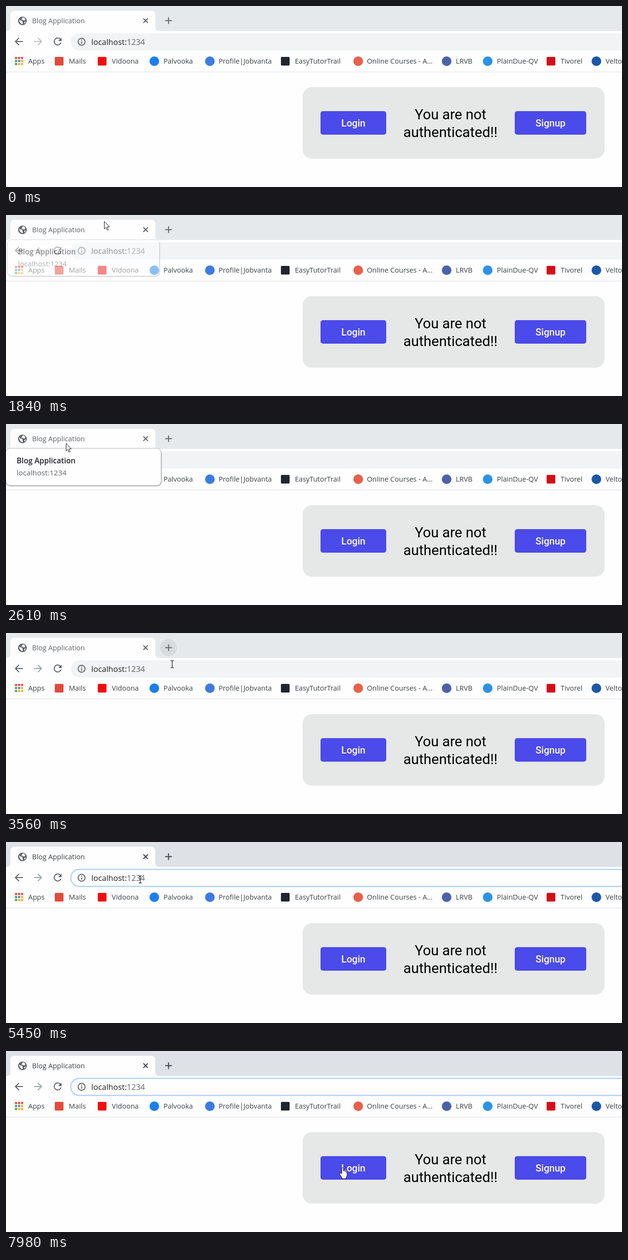
Animation of 1275x377 px, one loop 8 s. Source, as an HTML page:

```html
<!DOCTYPE html>
<html lang="en">
<head>
<meta charset="utf-8">
<title>Blog Application</title>
<style>
  html, body { margin: 0; width: 100%; height: 100%; overflow: hidden; background: #fefefe; }
  svg { display: block; --strip: #e6e9ec; --tab: #5f6368; --forward: #bcbec0; }
  svg.late { --forward: #98a4a6; }
  svg.active { --strip: #dee1e6; --tab: #3c4043; }
  text { font: 14.5px "Open Sans", "Noto Sans", sans-serif; fill: #3c4043; }
  .url { font-size: 16.5px; fill: #202124; }
  .grey { fill: #5f6368; }
  .tip { font-size: 15.3px; }
  .bold { font-size: 15.6px; font-weight: 600; fill: #202124; }
  .card text { font-family: Roboto, sans-serif; text-anchor: middle; }
  .card .note { font-size: 29.4px; fill: #000; }
  .card .label { font-size: 20px; font-weight: 500; fill: #fff; }
  .line { fill: none; stroke: #5f6368; stroke-width: 2; }
  .tabline { fill: none; stroke: var(--tab); stroke-width: 2; }
  .button { fill: #4b4aea; }
  #omnibox { fill: #f1f3f4; }
  .active #omnibox { fill: #fefefe; stroke: #b3d2f8; stroke-width: 2.5; }
</style>
</head>
<body>
<svg id="stage" width="1275" height="377" viewBox="0 0 1275 377">
  <rect width="1275" height="377" fill="#fefefe"/>
  <rect width="1275" height="52" fill="var(--strip)"/>
  <path d="M1 52Q9 52 9 44V19Q9 10 18 10H300Q309 10 309 19V44Q309 52 317 52Z" fill="#fefefe"/>
  <circle cx="34" cy="31" r="9" fill="#5f6368"/>
  <path d="M27 28Q30 31 34 31V34Q36 35 34 38Q28 36 27 28ZM34 24Q38 23 40 28Q38 32 35 29L31 28Q34 27 34 24ZM38 33L41 32Q40 36 38 37Z" fill="#fefefe"/>
  <text x="54" y="36" style="fill:var(--tab)">Blog Application</text>
  <path class="tabline" d="M284.3 25.800L293.700 35.200M293.700 25.800L284.300 35.200"/>
  <circle id="plusHover" cx="336.5" cy="30.5" r="17.5" fill="#d8dbde"/>
  <path class="tabline" d="M329.5 30.5H343.5M336.5 23.5V37.5"/>

  <path class="line" d="M35 74H20M27 66.5L19.5 74L27 81.5"/>
  <path class="line" style="stroke:var(--forward)" d="M58 74H73M66 66.5L73.5 74L66 81.5"/>
  <path class="line" d="M112.5 69A7.3 7.3 0 1 0 114 76"/>
  <path d="M115 66V73H108Z" fill="#5f6368"/>
  <rect id="omnibox" x="134" y="57" width="1200" height="35.5" rx="17.7"/>
  <circle class="line" cx="156.5" cy="74.5" r="7.2"/>
  <path class="line" d="M156.5 70V72M156.5 73.5V78.5"/>
  <text class="url" x="176.5" y="81">localhost:<tspan class="grey">1234</tspan></text>
  <path id="caret" d="M288.5 62V85" stroke="#202124"/>

  <rect id="pill" y="97" height="35" rx="17.5" fill="#ededee"/>
  <g id="bookmarks"></g>
  <path d="M0 137.5H1275" stroke="#dcdee1"/>

  <g class="card">
    <rect x="614" y="169" width="625" height="149" rx="19" fill="#e6e8e7"/>
    <rect class="button" x="651" y="219" width="136" height="49" rx="5"/>
    <rect class="button" x="1053" y="219" width="148" height="49" rx="5"/>
    <text class="label" x="719" y="251">Login</text>
    <text class="label" x="1127" y="251">Signup</text>
    <text class="note" x="920" y="236">You are not</text>
    <text class="note" x="920" y="273">authenticated!!</text>
  </g>

  <g id="tooltip">
    <rect x="-1" y="52" width="323.5" height="78" rx="10" fill="#000" opacity=".25"/>
    <rect x="-.5" y="50.5" width="321.5" height="77.5" rx="9" fill="#fefefe" stroke="#b0b2b4"/>
    <text class="tip bold" x="22" y="82">Blog Application</text>
    <text class="tip grey" x="22" y="107">localhost:1234</text>
  </g>

  <g id="cursor">
    <path id="arrow" d="M.5 .5V16L4 12.7L6.5 18.7L9 17.6L6.5 11.8H11.2Z" fill="#fff" stroke="#111"/>
    <path id="beam" d="M-3.5 -7.5H-1L0 -6.5L1 -7.5H3.5M0 -6.5V6.5M-3.5 7.5H-1L0 6.5L1 7.5H3.5" fill="none" stroke="#111" stroke-width="1.2"/>
    <path id="hand" d="M-2 12V1.5Q-2 0 -.2 0Q1.5 0 1.5 1.5V7Q3.5 6 4.5 8Q6.5 7 7 9Q9 8.5 9 11V15Q9 18 7 20V23H-2V20L-6.5 13.5Q-7 11.5 -5 11.5Z" fill="#fff" stroke="#111"/>
  </g>
</svg>
<script>
const $ = id => document.getElementById(id);
const show = (id, on) => { $(id).style.display = on ? "" : "none"; };
const clamp = v => Math.max(0, Math.min(1, v));
const svg = (tag, attrs, parent) => {
  const el = document.createElementNS("http://www.w3.org/2000/svg", tag);
  for (const key in attrs) el.setAttribute(key, attrs[key]);
  return parent.appendChild(el);
};

// icon left, text left, label, icon colour, round icon
const bookmarks = [
  [18, 46, "Apps"],
  [101, 130, "Mails", "#e34a3c"],
  [190, 219, "Vidoona", "#f20d0d"],
  [297, 326, "Palvooka", "#1a80ee", 1],
  [412, 440, "Profile|Jobvanta", "#3d7be0", 1],
  [569, 598, "EasyTutorTrail", "#22252e"],
  [719, 747, "Online Courses - A...", "#e8604c", 1],
  [902, 931, "LRVB", "#4c62a8", 1],
  [987, 1016, "PlainDue-QV", "#2b93e6", 1],
  [1119, 1148, "Tivorel", "#d40d18"],
  [1212, 1241, "Velto", "#1c58a8", 1],
  [1320]
];
const gridColors = ["#e2553f", "#e2553f", "#e2553f", "#4da25c", "#4b83dd", "#efb02c", "#4da25c", "#efb02c", "#efb02c"];
const bar = $("bookmarks");
for (const [x, textX, label, color, round] of bookmarks) {
  if (!label) continue;
  if (color) svg("rect", { x, y: round ? 105 : 106, width: round ? 20 : 18, height: round ? 20 : 18, rx: round ? 10 : 2, fill: color }, bar);
  else gridColors.forEach((fill, i) => svg("rect", { x: 18.5 + i % 3 * 6.3, y: 106 + Math.floor(i / 3) * 6.3, width: 4.5, height: 4.5, fill }, bar));
  svg("text", { x: textX, y: 120 }, bar).textContent = label;
}

// time, x, y
const path = [
  [320, 712, 334], [458, 661, 304], [600, 661, 304], [873, 215, 154],
  [1085, 215, 154], [1650, 210, 2], [1770, 207, 4], [1841, 203, 13],
  [1911, 200, 19], [2603, 124, 40], [2750, 122, 42], [3180, 322, 26],
  [3340, 353, 30], [3410, 357, 40], [3560, 347, 65], [3640, 325, 66],
  [3970, 148, 72], [4500, 148, 72], [4675, 287, 77], [5100, 287, 77],
  [5160, 288, 77], [5240, 288, 77], [5440, 278, 78], [6060, 203, 79],
  [6140, 203, 79], [6199, 204, 79], [6345, 204, 79], [6800, 460, 61],
  [7160, 575, 108], [7237, 574, 111], [7560, 636, 168], [7760, 672, 214],
  [7925, 697, 243]
];
function pointer(t) {
  const i = path.findIndex(p => p[0] > t);
  if (i < 0) return path[path.length - 1].slice(1);
  if (i === 0) return path[0].slice(1);
  const [a, b] = [path[i - 1], path[i]];
  const k = (t - a[0]) / (b[0] - a[0]);
  return [1, 2].map(n => Math.round(a[n] + (b[n] - a[n]) * k));
}

const LOOP = 8000, STEP = 69.17, START = 320, FOCUS = 4765, BLINK = 533;
function draw(t) {
  // the screen refreshes in even steps
  const q = START + Math.floor((t - START + 12) / STEP) * STEP;
  const [x, y] = pointer(q);
  const shown = t >= START;

  $("stage").setAttribute("class", (t >= 3300 ? "late " : "") + (t >= FOCUS ? "active" : ""));
  show("plusHover", q > 3170 && q < 3620);
  show("caret", t >= FOCUS && Math.floor((t - FOCUS - 20) / BLINK) % 2 <= 0);

  const fade = clamp((q - 1741) / 200) * clamp((3330 - q) / 140);
  const scale = 0.956 + 0.044 * fade;
  $("tooltip").setAttribute("opacity", fade);
  $("tooltip").setAttribute("transform", `translate(160 89) scale(${scale}) translate(-160 -89)`);

  const hover = shown && y > 97 && y < 132
    ? bookmarks.findIndex((b, i) => b[2] && x >= b[0] - 9 && x < bookmarks[i + 1][0] - 15) : -1;
  show("pill", hover >= 0);
  if (hover >= 0) {
    const left = bookmarks[hover][0] - 9;
    $("pill").setAttribute("x", left);
    $("pill").setAttribute("width", bookmarks[hover + 1][0] - 15 - left);
  }

  const overUrl = x > 172 && y > 55 && y < 94;
  const overLogin = x > 651 && x < 787 && y > 219 && y < 268;
  show("cursor", shown);
  show("beam", overUrl);
  show("hand", overLogin);
  show("arrow", !overUrl && !overLogin);
  $("cursor").setAttribute("transform", `translate(${x} ${y})`);
}

const begin = performance.now();
function tick() {
  draw((performance.now() - begin) % LOOP);
  requestAnimationFrame(tick);
}
tick();
</script>
</body>
</html>
```
